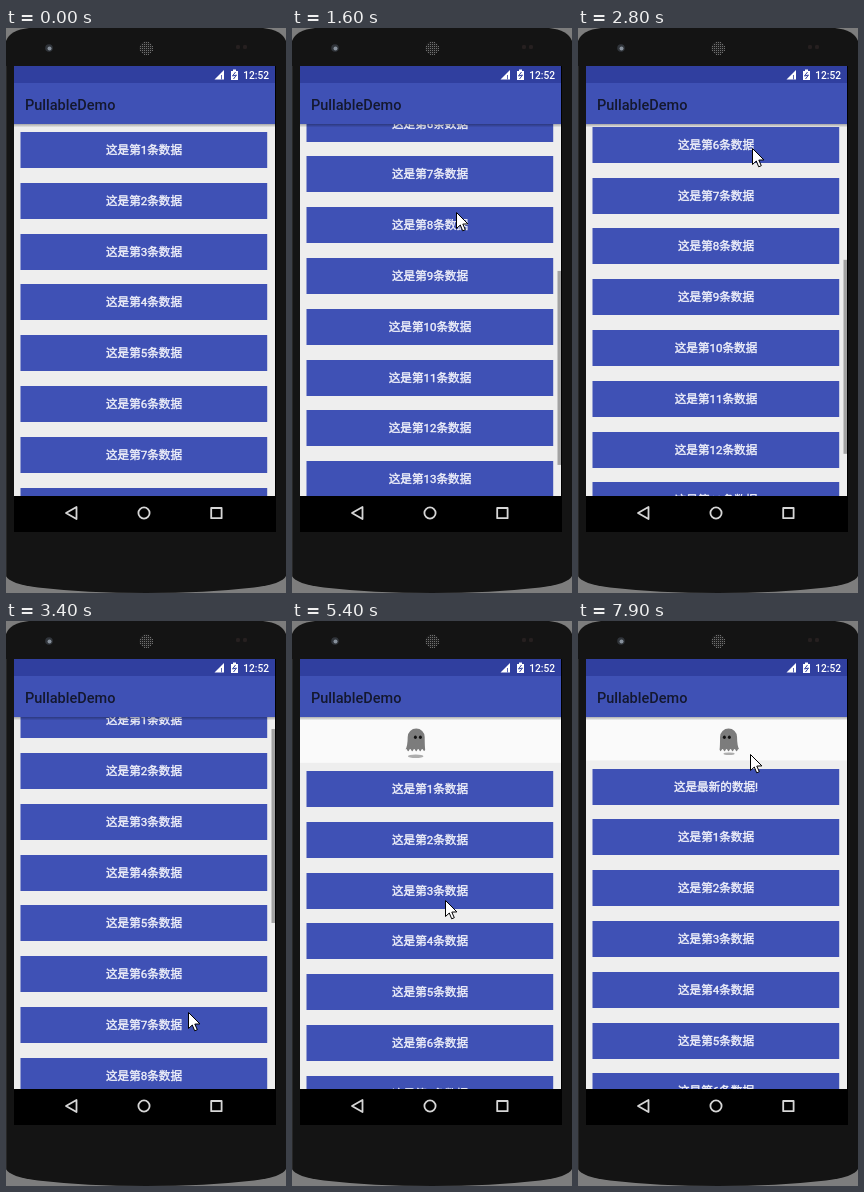
An HTML page with a canvas that plays this animation: 280 px wide and 565 px high, repeating every 8000 ms.

```html
<!DOCTYPE html>
<html lang="zh">
<head>
<meta charset="utf-8">
<style>
  html, body { margin: 0; width: 100%; height: 100%; overflow: hidden; background: #777; }
  canvas { display: block; width: 280px; height: 565px; }
</style>
</head>
<body>
<canvas id="stage"></canvas>
<script>
const LOOP = 8000, STEP = 100, RELEASE = 5100, LOADED = 7900;
const LIST_TOP = 96, LIST_BOTTOM = 468, LIST_H = LIST_BOTTOM - LIST_TOP;
const PITCH = 50.8, HEADER = 43.5, MAX_SCROLL = 338, MAX_PULL = 82;
const BLUE = '#3f51b5', NAVY = '#303f9f', GRAY = '#4d4d4d';
const SANS = 'Roboto, "Noto Sans CJK SC", "Noto Sans CJK", sans-serif';

const canvas = document.getElementById('stage');
const dpr = window.devicePixelRatio || 1;
canvas.width = 280 * dpr;
canvas.height = 565 * dpr;
const c = canvas.getContext('2d');

const ramp = (t, a, b) => Math.min(1, Math.max(0, (t - a) / (b - a)));
const easeOut = k => 1 - (1 - k) ** 2;
const smooth = k => k * k * (3 - 2 * k);
const mix = (a, b, k) => a + (b - a) * k;

// Where the hand turns: time, x, y
const turns = [
  [100, 166, 240], [900, 200, 420], [1200, 157, 263], [2100, 173, 74], [2600, 173, 70],
  [3400, 182, 391], [4100, 150, 118], [4800, 151, 274], [5200, 151, 274],
  [6400, 179, 337], [7400, 172, 133]
];

function cursorAt(t) {
  let [, x, y] = turns[0];
  for (let i = 1; i < turns.length; i++) {
    const k = smooth(ramp(t, turns[i - 1][0], turns[i][0]));
    x = mix(x, turns[i][1], k);
    y = mix(y, turns[i][2], k);
  }
  return [Math.round(x), Math.round(y)];
}

const scrollAt = t => MAX_SCROLL * (easeOut(ramp(t, 960, 2050)) - ramp(t, 2600, 3458));

function pullAt(t) {
  const dragged = MAX_PULL * easeOut(ramp(t, 4100, 5000));
  return mix(dragged, HEADER, t > RELEASE ? easeOut(ramp(t, RELEASE, RELEASE + 400)) : 0);
}

function rect(x, y, w, h, fill) {
  c.fillStyle = fill;
  c.fillRect(x, y, w, h);
}

function disc(x, y, rx, ry, fill) {
  c.fillStyle = fill;
  c.beginPath();
  c.ellipse(x, y, rx, ry, 0, 0, Math.PI * 2);
  c.fill();
}

function poly(points, { fill, stroke, width = 1, open = false }) {
  c.beginPath();
  points.forEach(([x, y]) => c.lineTo(x, y));
  if (!open) c.closePath();
  if (fill) { c.fillStyle = fill; c.fill(); }
  if (stroke) { c.strokeStyle = stroke; c.lineWidth = width; c.stroke(); }
}

// A thin outline gives the medium weight that the CJK face lacks.
function label(text, x, y, size, { weight = 400, fill = '#fff', align = 'left', outline = 0 } = {}) {
  c.font = `${weight} ${size}px ${SANS}`;
  c.textAlign = align;
  c.fillStyle = c.strokeStyle = fill;
  c.lineJoin = 'round';
  c.lineWidth = outline;
  if (outline) c.strokeText(text, x, y);
  c.fillText(text, x, y);
}

function drawPhone() {
  rect(0, 0, 280, 565, '#7d7d7d');
  for (const side of [-1, 1]) {
    c.save();
    c.translate(140, 0);
    c.scale(side, 1);
    c.beginPath();
    c.moveTo(-0.5, 0);
    c.lineTo(117, 0);
    c.quadraticCurveTo(136, 2, 140, 13);
    c.lineTo(140, 548);
    c.quadraticCurveTo(136, 556, 108, 559.5);
    c.quadraticCurveTo(60, 565, -0.5, 565);
    c.fillStyle = '#141414';
    c.fill();
    c.restore();
  }
  rect(0, 38, 1, 510, '#272727');
  disc(43, 20, 3.8, 3.8, '#30343a');
  disc(43.5, 20.5, 2, 2, '#87909b');
  disc(140, 20, 6.8, 6.8, '#1f1f1f');
  for (let y = -6; y <= 6; y += 2)
    for (let x = -6; x <= 6; x += 2)
      if (x * x + y * y < 44) rect(140 + x, 20 + y, 1, 1, '#707070');
  for (const x of [232, 239]) disc(x, 19, 2.2, 2.2, '#262020');
}

function drawBars() {
  rect(8, 38, 261, 17, NAVY);
  rect(8, 55, 261, 41, BLUE);
  label('PullableDemo', 19, 81.5, 14.5, { weight: 500, fill: '#14182f' });
  label('12:52', 263, 51, 10.2, { weight: 500, align: 'right' });
  poly([[208.5, 51.5], [218, 51.5], [218, 42]], { fill: '#fff' });
  rect(215, 47, 1, 4.5, '#5a66b2');
  rect(225, 43, 7, 9, '#fff');
  rect(227, 41.5, 3, 1.5, '#fff');
  poly([[229.5, 44], [226.5, 48], [230.5, 47], [227.5, 51]], { stroke: NAVY, open: true });

  rect(8, LIST_BOTTOM, 262, 36, '#000');
  rect(269, 38, 1, 430, '#000');
  c.lineJoin = 'round';
  poly([[70.5, 479], [70.5, 491], [60, 485]], { stroke: '#d6d6d6', width: 1.8 });
  c.beginPath();
  c.arc(138, 485, 5.6, 0, Math.PI * 2);
  c.stroke();
  c.strokeRect(205.2, 480, 10.4, 10.2);
}

function drawPrompt(pull) {
  const y = LIST_TOP + pull - HEADER / 2;
  rect(113.4, y - 10, 3.2, 18, GRAY);
  c.lineJoin = 'miter';
  poly([[110, y + 4], [115, y + 9.5], [120, y + 4]], { stroke: GRAY, width: 2.6, open: true });
  label(pull > HEADER + 5 ? '松开刷新' : '下拉刷新', 127, y + 4.8, 11.5, { fill: '#555' });
}

// Floats side to side, dipping twice per crossing; the shadow shrinks on each dip.
function drawGhost(t, pull) {
  const phase = Math.max(0, t - 5289) / 2222 % 2;
  const dir = phase > 1 ? -1 : 1;
  const v = 1 - Math.abs(1 - phase);
  const hop = 5 * (1 - Math.abs(1 - (v % 0.5) * 4));
  const x = 139.5 + (v - 0.5) * 34;
  const base = LIST_TOP + pull - HEADER;
  disc(x - dir * 0.5, base + 36.8, 8.6 - hop * 0.85, 2 - hop * 0.2, '#adadad');
  c.save();
  c.translate(x, base + 8 + hop);
  c.scale(dir, 1);
  c.beginPath();
  c.arc(0, 8.5, 8.5, Math.PI, 0);
  c.quadraticCurveTo(8.5, 18, 9, 21);
  for (let px = 9; px > -11; px -= 4) {
    c.quadraticCurveTo(px - 1, 24, px - 2, 21.5);
    c.quadraticCurveTo(px - 3, 19.5, px - 4, 21.5);
  }
  c.quadraticCurveTo(-8.5, 18, -8.5, 8.5);
  c.fillStyle = '#7c7c7c';
  c.fill();
  for (const eye of [-0.8, 4.2]) disc(eye, 8.8, 1.5, 1.7, '#111');
  c.restore();
}

function drawItems(offset, fresh) {
  for (let i = 0; i < 14 + fresh; i++) {
    const y = Math.round(104 + i * PITCH + offset);
    rect(14.5, y, 246.7, 36, BLUE);
    const text = i < fresh ? '这是最新的数据!' : `这是第${i + 1 - fresh}条数据`;
    label(text, 138, y + 22.4, 11.6, { fill: '#f0f1fa', align: 'center', outline: 0.4 });
  }
}

function drawScrollbar(t, scroll) {
  c.globalAlpha = ramp(t, 950, 1000) - ramp(t, 3700, 4000);
  rect(265.5, LIST_TOP + scroll * LIST_H / (LIST_H + MAX_SCROLL), 3.5, 194, '#a2a2a2');
  c.globalAlpha = 1;
}

function drawList(t) {
  const scroll = scrollAt(t), pull = pullAt(t);
  c.save();
  c.beginPath();
  c.rect(8, LIST_TOP, 261, LIST_H);
  c.clip();
  rect(8, LIST_TOP, 261, LIST_H, '#eee');
  rect(8, LIST_TOP, 261, pull, '#fafafa');
  if (t > RELEASE) drawGhost(t, pull);
  else if (pull > 0) drawPrompt(pull);
  drawItems(pull - scroll, t >= LOADED ? 1 : 0);
  drawScrollbar(t, scroll);
  const shade = c.createLinearGradient(0, LIST_TOP, 0, LIST_TOP + 3.5);
  shade.addColorStop(0, 'rgba(0,0,0,.3)');
  shade.addColorStop(1, 'rgba(0,0,0,0)');
  rect(8, LIST_TOP, 261, 3.5, shade);
  c.restore();
}

function drawCursor(t) {
  if (t < turns[0][0]) return;
  const [x, y] = cursorAt(t);
  c.save();
  c.translate(x + 0.5, y + 0.5);
  c.lineJoin = 'miter';
  poly([[0, 0], [0, 16], [3.8, 12.5], [6.2, 18.3], [8.8, 17.2], [6.3, 11.6], [11.4, 11.4]],
    { fill: '#fff', stroke: '#000' });
  c.restore();
}

function frame(now) {
  const t = Math.floor((now % LOOP) / STEP) * STEP;
  c.setTransform(dpr, 0, 0, dpr, 0, 0);
  drawPhone();
  drawList(t);
  drawBars();
  drawCursor(t);
  requestAnimationFrame(frame);
}
requestAnimationFrame(frame);
</script>
</body>
</html>
```
